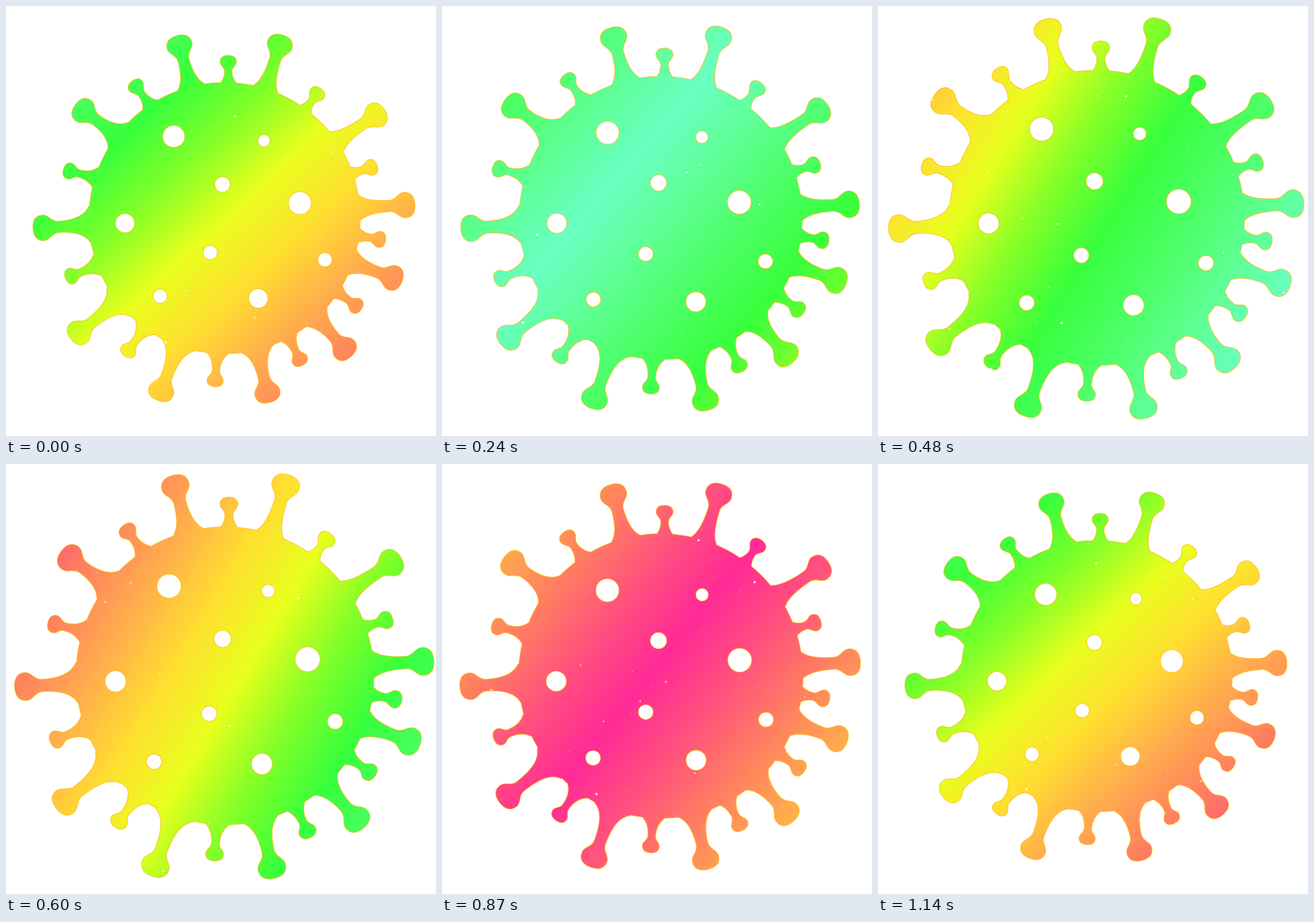
Animation of 600 by 600 pixels, one loop 1.17 s. Source, as an HTML page with a canvas:

```html
<!DOCTYPE html>
<html>
<head>
<meta charset="utf-8">
<style>
html, body { margin: 0; width: 100%; height: 100%; overflow: hidden; background: #fff; }
canvas { display: block; width: 600px; height: 600px; }
</style>
</head>
<body>
<canvas id="stage" width="600" height="600"></canvas>
<script>
const ctx = document.getElementById('stage').getContext('2d');
const SIZE = 600, MID = SIZE / 2, TAU = Math.PI * 2;
const STEP = 30, FRAMES = 39, LOOP = STEP * FRAMES;
const GROWTH = 0.1037, BODY_RADIUS = 189, EDGE = '#ffbe1e';

// Directions of the large spikes in degrees; a small one stands midway between neighbours.
const angles = [-103.4, -71.6, -34.3, -4.9, 18.4, 46.1, 75, 109.4, 141.8, 177.7, 218.6];

// Holes: x, y, radius.
const holes = [
  [234, 182, 15], [360, 188, 8], [302, 249, 10.5], [410, 275, 15.5], [166, 303, 13],
  [285, 344, 9.5], [445, 354, 9.5], [215, 405, 9.5], [352, 408, 13]
];

// Half a colour cycle in even steps; the other half runs back.
const palette = ['#69ffc3', '#5eff94', '#4bff64', '#37ff3c', '#82ff28', '#e8ff1c',
  '#ffde30', '#ffac4d', '#ff7e61', '#ff507e', '#ff2a96'];
const LAST = palette.length - 1;

function addSpike(path, degrees, reach, knob) {
  const angle = degrees * Math.PI / 180, cos = Math.cos(angle), sin = Math.sin(angle);
  const tip = [MID + reach * cos, MID + reach * sin];
  const base = [302 + BODY_RADIUS * cos, 298 + BODY_RADIUS * sin];
  const dx = base[0] - tip[0], dy = base[1] - tip[1];
  const len = Math.hypot(dx, dy), neck = knob * 0.43, flare = knob * 1.45;

  const p = new Path2D();
  p.moveTo(len + 15, flare);
  p.lineTo(len + 4, flare);
  p.bezierCurveTo(len - 2, neck + flare * 0.25, len - flare * 0.6, neck, knob * 2, neck);
  p.bezierCurveTo(knob * 1.4, neck, knob * 1.3, knob, knob * 0.8, knob);
  p.bezierCurveTo(knob * 0.25, knob, 0, knob * 0.6, 0, 0);
  p.bezierCurveTo(0, -knob * 0.6, knob * 0.25, -knob, knob * 0.8, -knob);
  p.bezierCurveTo(knob * 1.3, -knob, knob * 1.4, -neck, knob * 2, -neck);
  p.bezierCurveTo(len - flare * 0.6, -neck, len - 2, -neck - flare * 0.25, len + 4, -flare);
  p.lineTo(len + 15, -flare);
  p.closePath();
  const turn = Math.atan2(dy, dx) * 180 / Math.PI;
  path.addPath(p, new DOMMatrix().translate(...tip).rotate(turn));
}

const body = new Path2D();
body.arc(305, 296, BODY_RADIUS, 0, TAU);
body.closePath();
angles.forEach((angle, i) => {
  const next = i + 1 < angles.length ? angles[i + 1] : angles[0] + 360;
  const rad = angle * Math.PI / 180;
  // Slightly longer towards the upper right.
  const reach = 266 - 5 * Math.sin(2 * rad) + 5 * Math.cos(rad + 0.6);
  addSpike(body, angle, reach, 17.5);
  addSpike(body, (angle + next) / 2, 231, 11);
});

const pores = new Path2D();
for (const [x, y, r] of holes) {
  pores.moveTo(x + r, y);
  pores.arc(x, y, r, 0, TAU);
}

let seed = 11;
const random = () => (seed = (seed * 16807) % 2147483647) / 2147483647;
const stars = Array.from({ length: 110 }, () => ({
  x: random() * SIZE, y: random() * SIZE,
  r: 0.5 + random() ** 5 * 1.5, alpha: 0.3 + random() * 0.6
}));

// Palette colour for a phase counted in cycles.
function colour(phase) {
  const cycle = phase - Math.floor(phase);
  const p = LAST * (1 - Math.abs(1 - 2 * cycle));
  const i = Math.min(Math.floor(p), LAST - 1);
  const channel = (hex, c) => parseInt(hex.slice(1 + 2 * c, 3 + 2 * c), 16);
  const rgb = [0, 1, 2].map(c => {
    const from = channel(palette[i], c), to = channel(palette[i + 1], c);
    return Math.round(from + (to - from) * (p - i));
  });
  return `rgb(${rgb})`;
}

// A wave running to the lower right whose direction sways a little.
function rainbow(time) {
  const half = 450, wavelength = 1800, samples = 80;
  const angle = (39 + 8 * Math.cos(TAU * time)) * Math.PI / 180;
  const dx = half * Math.cos(angle), dy = half * Math.sin(angle);
  const gradient = ctx.createLinearGradient(MID - dx, MID - dy, MID + dx, MID + dy);
  for (let i = 0; i <= samples; i++) {
    const k = i / samples;
    gradient.addColorStop(k, colour(0.75 + time - (2 * k - 1) * half / wavelength));
  }
  return gradient;
}

function draw(frame) {
  const time = frame / FRAMES, peak = (FRAMES - 1) / 2;
  const scale = 1 + GROWTH * (1 - Math.abs(frame - peak) / peak);
  const offset = MID * (1 - scale);

  ctx.setTransform(1, 0, 0, 1, 0, 0);
  ctx.fillStyle = '#fff';
  ctx.fillRect(0, 0, SIZE, SIZE);

  ctx.setTransform(scale, 0, 0, scale, offset, offset);
  ctx.strokeStyle = EDGE;
  ctx.lineWidth = 1.6 / scale;
  ctx.stroke(body);

  ctx.save();
  ctx.clip(body);
  ctx.setTransform(1, 0, 0, 1, 0, 0);
  ctx.fillStyle = rainbow(time);
  ctx.fillRect(0, 0, SIZE, SIZE);
  ctx.fillStyle = '#fff';
  for (const star of stars) {
    ctx.globalAlpha = star.alpha;
    ctx.beginPath();
    ctx.arc((star.x + SIZE * time) % SIZE, (star.y + SIZE * time) % SIZE, star.r, 0, TAU);
    ctx.fill();
  }
  ctx.restore();

  ctx.stroke(pores);
  ctx.fillStyle = '#fff';
  ctx.fill(pores);
}

let shown = -1;
const start = performance.now();
function tick() {
  const frame = Math.floor((performance.now() - start) / STEP) % FRAMES;
  if (frame !== shown) draw(shown = frame);
  requestAnimationFrame(tick);
}
tick();
</script>
</body>
</html>
```
